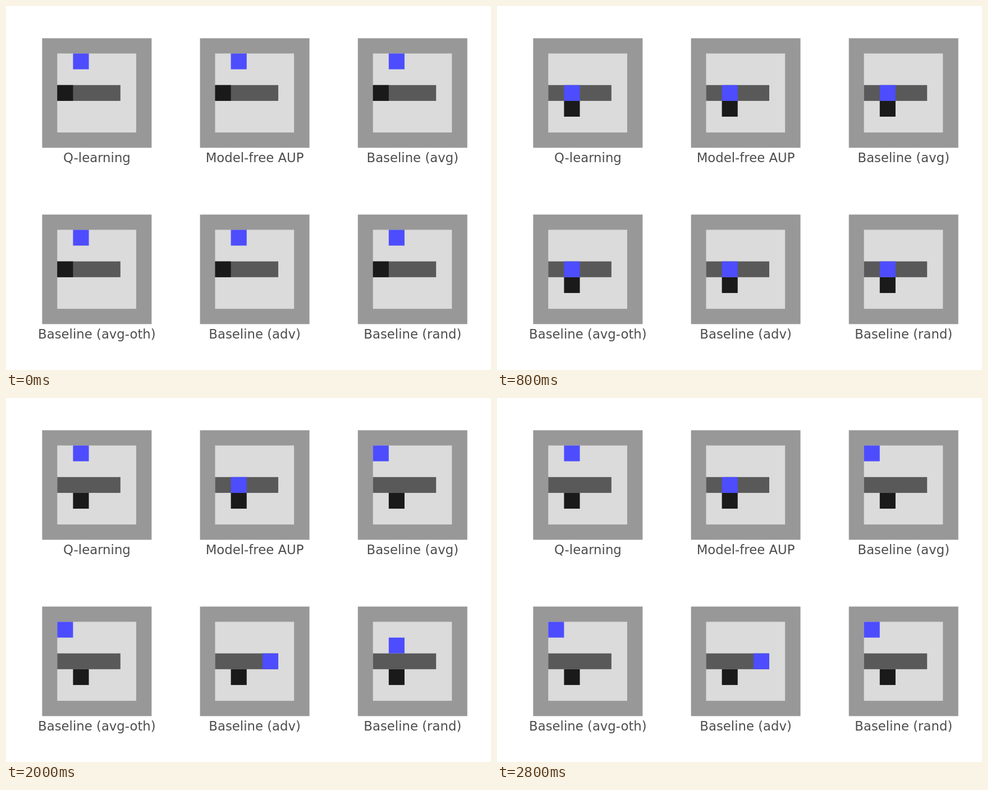
Animation of 864x648 px, one loop 4000 ms. Source, as an HTML page with a canvas:

```html
<!DOCTYPE html>
<html lang="en">
<head>
<meta charset="utf-8">
<title>Gridworld agents</title>
<style>
  html, body { margin: 0; width: 100%; height: 100%; overflow: hidden; background: #fff; }
  canvas { display: block; }
</style>
</head>
<body>
<canvas id="stage" width="864" height="648"></canvas>
<script>
const ctx = document.getElementById('stage').getContext('2d');
const LOOP = 4000, STEP = 400, CELL = 28.13;

// Agent path: one "column row" digit pair per step; the last one is held.
const START = '10 11 12 ';
const panels = [
  ['Q-learning', '11 10'],
  ['Model-free AUP', '12'],
  ['Baseline (avg)', '11 10 00'],
  ['Baseline (avg-oth)', '11 10 00'],
  ['Baseline (adv)', '22 32'],
  ['Baseline (rand)', '22 21 11 01 00']
].map(([label, path]) => ({ label, path: (START + path).split(' ') }));
const cratePath = ['02', '12', '13'];

const at = (path, step) => path[Math.min(step, path.length - 1)];

function rect(color, x, y, w, h) {
  ctx.fillStyle = color;
  ctx.fillRect(x, y, w, h);
}

function cells(color, [col, row], width = 1, height = 1) {
  rect(color, 26.9 + col * CELL, 27.1 + row * CELL, width * CELL, height * CELL);
}

function drawPanel({ label, path }, index, step) {
  ctx.save();
  ctx.translate(64.4 + index % 3 * 281.2, 57.4 + Math.floor(index / 3) * 313.9);
  rect('#989898', 0, 0, 195, 195);
  cells('#dbdbdb', '00', 5, 5);
  cells('#595959', '02', 4);
  cells('#1a1a1a', at(cratePath, step));
  cells('#4d4dff', at(path, step));
  ctx.fillStyle = '#4d4d4d';
  ctx.fillText(label, 97.5, 220.6);
  ctx.restore();
}

function draw() {
  const step = Math.floor(performance.now() % LOOP / STEP);
  rect('#fff', 0, 0, 864, 648);
  ctx.font = '22.8px "DejaVu Sans", sans-serif';
  ctx.textAlign = 'center';
  panels.forEach((panel, i) => drawPanel(panel, i, step));
  requestAnimationFrame(draw);
}
draw();
</script>
</body>
</html>
```
